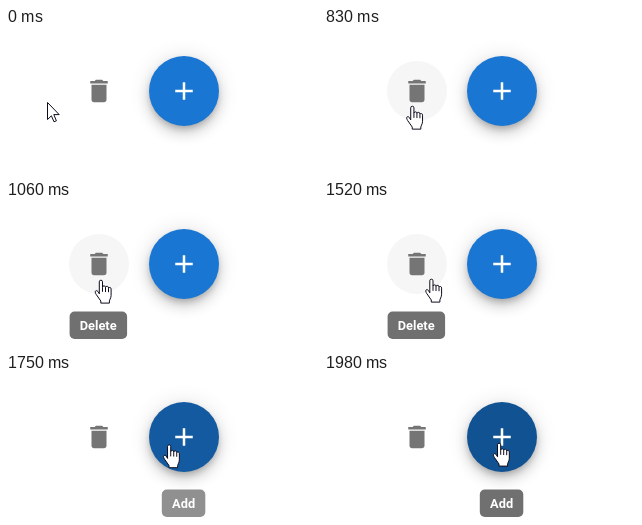
These frames come from a looping animation (312 by 145 pixels, 2.46 s). An HTML page:

```html
<!DOCTYPE html>
<html lang="en">
<head>
<meta charset="utf-8">
<title>Icon buttons with tooltips</title>
<style>
html, body { margin: 0; width: 100%; height: 100%; overflow: hidden; background: #fff; }
#stage { position: relative; width: 312px; height: 145px; overflow: hidden; }
#fab {
  position: absolute; left: 143px; top: 28px; width: 70px; height: 70px; border-radius: 50%;
  box-shadow: 0 3.75px 6.25px -1.25px rgba(0,0,0,.2), 0 7.5px 12.5px rgba(0,0,0,.14), 0 1.25px 22.5px rgba(0,0,0,.12);
}
svg { position: absolute; left: 0; top: 0; display: block; }
text { font: 700 12.8px Roboto, sans-serif; fill: #fff; text-anchor: middle; }
.cursor { fill: #fff; stroke: #0c0c1c; stroke-linejoin: round; }
</style>
</head>
<body>
<div id="stage">
  <div id="fab"></div>
  <svg width="312" height="145" viewBox="0 0 312 145">
    <circle id="halo" cx="93" cy="63" r="30" fill="#f6f6f6"/>
    <path transform="translate(78 48) scale(1.25)" fill="#757575"
      d="M6 19c0 1.1.9 2 2 2h8c1.1 0 2-.9 2-2V7H6v12zM19 4h-3.5l-1-1h-5l-1 1H5v2h14V4z"/>
    <path transform="translate(163 48) scale(1.25)" fill="#fff" d="M19 13h-6v6h-2v-6H5v-2h6V5h2v6h6v2z"/>
    <g id="tipDelete">
      <rect x="63.6" y="110.5" width="57.5" height="27.5" rx="5" fill="#707070"/>
      <text x="92.2" y="129">Delete</text>
    </g>
    <g id="tipAdd">
      <rect x="155.8" y="115.5" width="43.5" height="27.5" rx="5" fill="#707070"/>
      <text x="177.6" y="134">Add</text>
    </g>
    <path id="arrow" class="cursor" d="M.5.5V17.5l3.9-3.7 2.6 6 2.4-1L6.8 12.6h5.4z"/>
    <g id="hand" class="cursor">
      <path d="M5 14V2a1.6 1.6 0 0 1 3.2 0V7.4a1.5 1.5 0 0 1 3 .3a1.5 1.5 0 0 1 3 .7a1.4 1.4 0 0 1 2.6.9V15.5q0 2-1 3.8l-.7 1.8V23.3H6.5V21.2L2 14.8C.2 12.2 1 10.6 2.4 10.8q1.2.2 2.6 3.2z"/>
      <path fill="none" d="M8.2 7.4V12M11.2 7.7V12.2M14.2 8.4V12.4"/>
    </g>
  </svg>
</div>
<script>
const LOOP = 2460;
const $ = id => document.getElementById(id);

// Two pointer moves; the screen refreshes in equal steps during each
const rest = { start: 0, span: 1, steps: 1, from: [41, 74], to: [41, 74], power: 1 };
const toTrash = { start: 690, span: 350, steps: 5, from: [58, 74], to: [95.3, 79.5], power: 3.4 };
const toFab = { start: 1520, span: 460, steps: 6, from: [107.8, 78.5], to: [175.5, 69.5], power: 2.5 };

const mix = (a, b, p) => a.map((v, i) => v + (b[i] - v) * p);

function fade(t, start, length) {
  const p = Math.min(1, Math.max(0, (t - start) / length));
  return p * p * (3 - 2 * p);
}

function draw(now) {
  const move = [toFab, toTrash, rest].find(m => now >= m.start);
  const step = Math.min(move.steps, Math.floor((now - move.start) * move.steps / move.span));
  const part = step / move.steps;
  const t = move.start + move.span * part;
  const [x, y] = mix(move.from, move.to, 1 - (1 - part) ** move.power);

  const away = 1 - fade(t, 1590, 140);
  const add = fade(t, 1612, 200);
  $('halo').setAttribute('opacity', fade(t, 720, 100) * away);
  $('tipDelete').setAttribute('opacity', fade(t, 850, 180) * away);
  $('tipAdd').setAttribute('opacity', add);
  $('fab').style.background = `rgb(${mix([25, 118, 210], [17, 82, 147], add).map(Math.round)})`;

  const over = Math.hypot(x - 93, y - 63) < 30 || Math.hypot(x - 178, y - 63) < 35;
  $('arrow').setAttribute('visibility', over ? 'hidden' : 'visible');
  $('hand').setAttribute('visibility', over ? 'visible' : 'hidden');
  $('arrow').setAttribute('transform', `translate(${x} ${y})`);
  $('hand').setAttribute('transform', `translate(${x - 7} ${y - .7})`);
}

const begin = performance.now();
function tick() {
  draw((performance.now() - begin) % LOOP);
  requestAnimationFrame(tick);
}
tick();
</script>
</body>
</html>
```
